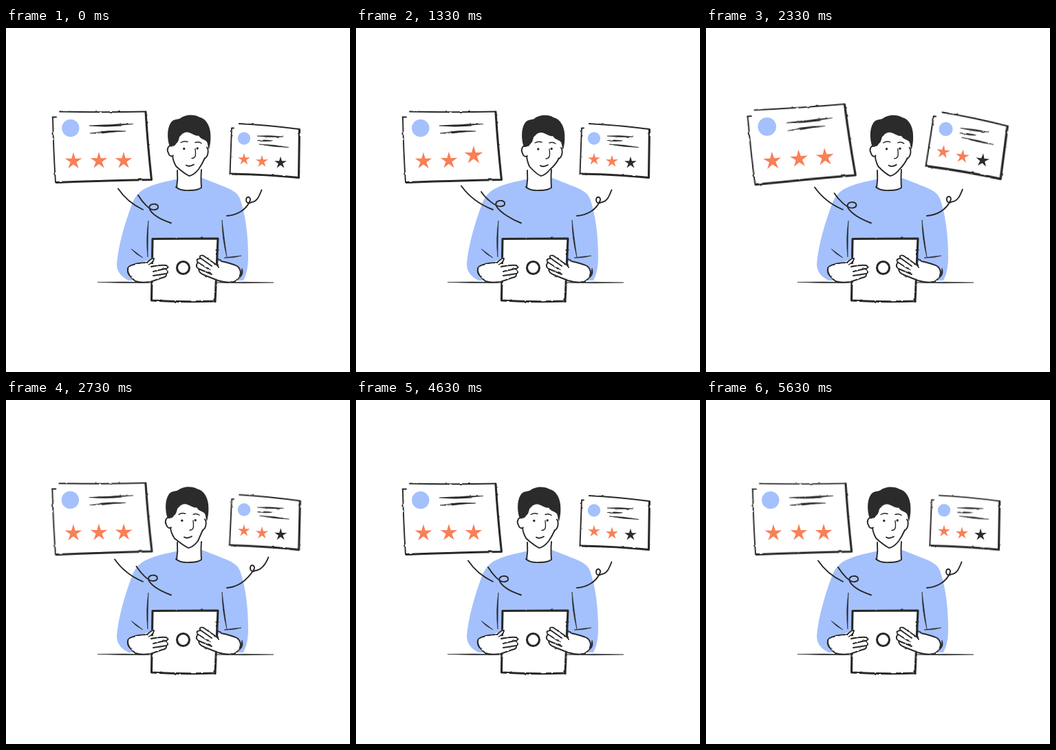
Recreate the animation shown at these times as an HTML page. Size 500 by 500 pixels, loop 5710 ms.

```html
<!DOCTYPE html>
<html lang="en">
<head>
<meta charset="utf-8">
<title>Reviews</title>
<style>
  html, body { margin: 0; width: 100%; height: 100%; overflow: hidden; background: #fff; }
  svg { display: block; width: 100%; height: 100%; }
  .line { fill: none; stroke: #282828; stroke-width: 1.9; stroke-linecap: round; stroke-linejoin: round; }
  .thick { stroke-width: 3.1; }
  .thin { stroke-width: 1.4; }
  .ink { fill: #2b2b2b; }
  .blue { fill: #a4c1fd; }
  .white { fill: #fff; }
  .orange { fill: #f87f56; }
  .rough { filter: url(#rough); }
</style>
</head>
<body>
<svg id="stage" viewBox="0 0 500 500">
  <filter id="rough" color-interpolation-filters="sRGB">
    <feTurbulence type="fractalNoise" baseFrequency="0.12" numOctaves="2" seed="4"/>
    <feDisplacementMap in="SourceGraphic" scale="2.2" xChannelSelector="R" yChannelSelector="G"/>
  </filter>

  <g id="table"></g>

  <g id="body">
    <path class="blue" d="M247 220C232 223 215 227 205 232C193 237 187 246 183 256C173 283 163 316 161 343C161 354 167 361 178 367L345 367C350 358 352 346 352 334C352 300 348 270 340 248C336 238 326 234 313 229C303 225 294 221 285 218Z"/>
    <path class="white" d="M249 200L248 233Q266 240 284 232L284 200Z"/>
    <path class="line" d="M249 207Q250 220 248 232M284 206Q283 220 284 231"/>
    <path class="line" d="M247 231Q253 237 267 236Q279 236 284 232"/>
  </g>

  <g id="head">
    <path id="skin" class="white"/>
    <path id="jaw" class="line"/>
    <g id="face">
      <path class="white line" d="M247 172C242 170 239 177 242 182C243 186 246 188 249 186"/>
      <path class="white line" d="M298 174C301 178 300 187 295 190"/>
      <path class="ink" d="M244 173C240 162 240 147 245 139C249 132 255 134 259 132C267 125 281 126 287 130C297 132 302 143 303 152C304 162 303 170 301 177C299 174 300 170 298 166C295 162 290 163 286 157C281 158 276 153 270 152C265 152 262 154 260 157C257 158 258 163 255 167C252 169 252 173 248 172Z"/>
      <path class="line thin" d="M260 167Q265 164 270 166M281 167Q286 165 290 168M281 176Q282 184 281 187Q279 190 276 190"/>
      <path class="line" d="M268 200Q272 203 279 199"/>
      <circle class="ink" cx="264.8" cy="176" r="1.7"/>
      <circle class="ink" cx="284.2" cy="175.5" r="1.7"/>
    </g>
  </g>

  <g id="sleeves"></g>

  <path class="white line thick rough" d="M213 306.5L308 306L304 397Q258 399 211.5 396Z"/>
  <circle class="line thick" cx="257.5" cy="348.5" r="9"/>

  <g id="hands" class="rough">
    <path class="white" d="M178 347C188 340 199 342 208 337Q214 332 215 336L211 343L233 344Q238 348 235 355Q235 362 226 365L211 369L188 369Q175 360 178 347Z"/>
    <path class="line" d="M205 341Q212 334 215 335Q215 340 208 344M211 347Q224 344 233 345Q238 349 231 350L213 354M231 350Q238 353 233 357L214 360M233 357Q234 362 227 363L210 369Q196 371 188 368"/>
    <path class="line" d="M205 341Q188 341 178 347Q174 357 187 367"/>
    <path class="white" d="M281 332Q284 328 289 332L307 344Q309 338 314 338C323 343 336 341 341 351Q342 362 331 369L308 368L284 358L277 347Q274 338 282 336Z"/>
    <path class="line" d="M307 345L287 331Q281 329 282 334L299 346M283 335Q276 335 278 340L297 352M278 342Q275 347 280 350L299 358M280 350Q280 356 288 359L308 367Q322 371 331 369"/>
    <path class="line" d="M309 348Q306 340 307 337Q310 335 313 339Q327 342 336 346Q344 353 339 362Q336 367 331 369"/>
  </g>

  <path id="tail" class="line"/>
  <path id="leftCurl" class="line"/>
  <path id="rightCurl" class="line"/>
  <g id="bigCard"></g>
  <g id="smallCard"></g>
</svg>

<script>
const LOOP = 5710, HALF = LOOP / 2;
const $ = id => document.getElementById(id);
const lerp = (a, b, k) => a + (b - a) * k;
const mix = (p, q, k) => [lerp(p[0], q[0], k), lerp(p[1], q[1], k)];

function add(parent, tag, attrs) {
  const node = document.createElementNS("http://www.w3.org/2000/svg", tag);
  for (const key in attrs) node.setAttribute(key, attrs[key]);
  return parent.appendChild(node);
}

// A brush stroke that swells in the middle.
function brush(parent, x1, y1, x2, y2, width, bend = 0) {
  const len = Math.hypot(x2 - x1, y2 - y1);
  const nx = (y1 - y2) / len, ny = (x2 - x1) / len;
  const mx = (x1 + x2) / 2, my = (y1 + y2) / 2;
  const mid = k => `${mx + nx * k} ${my + ny * k}`;
  const d = `M${x1} ${y1}Q${mid(bend + width)} ${x2} ${y2}Q${mid(bend - width)} ${x1} ${y1}Z`;
  add(parent, "path", { d, class: "ink", stroke: "#2b2b2b", "stroke-width": 0.6 });
}

function star(parent, x, y, r, fill = "orange") {
  const points = Array.from({ length: 10 }, (_, i) => {
    const a = i * Math.PI / 5 - Math.PI / 2, k = i % 2 ? r * 0.36 : r;
    return `${(Math.cos(a) * k).toFixed(2)},${(Math.sin(a) * k).toFixed(2)}`;
  }).join(" ");
  const node = add(parent, "polygon", { points, class: fill, transform: `translate(${x} ${y})` });
  return { node, x, y };
}

brush($("table"), 133, 369.5, 212, 370, 1.5);
brush($("table"), 304, 370, 389, 370, 1.5);

const sleeves = $("sleeves");
brush(sleeves, 207, 280, 206, 333, 1.6, 2);
brush(sleeves, 314, 279, 321, 333, 1.6, 2);
brush(sleeves, 182, 321, 199, 334, 1.4, 1);
brush(sleeves, 317, 334, 342, 331, 1.5, 1);
brush(sleeves, 177, 348, 181, 362, 2, 3);
brush(sleeves, 343, 349, 340, 363, 2, -3);

const big = $("bigCard");
const bigFrame = add(big, "g", { class: "rough" });
add(bigFrame, "path", { class: "white", d: "M68 122L204 121L212 221L73 225Z" });
add(bigFrame, "path", { class: "line", d: "M78 121.5Q140 123 203 121.5M67.5 129.5L73 129.5M68 130Q69 180 72 224" });
add(bigFrame, "path", { class: "line thick", d: "M203 122Q206 170 211.5 220.5Q140 222 73 224.5" });
brush(bigFrame, 121, 142, 168, 142, 2.4);
brush(bigFrame, 138, 142, 185, 139.5, 2);
brush(bigFrame, 122, 153, 160, 150.5, 2.2);
brush(bigFrame, 138, 150.5, 174, 150, 1.8);
add(big, "circle", { class: "blue", cx: 93.8, cy: 145.5, r: 12.7 });

const small = $("smallCard");
const smallFrame = add(small, "g", { class: "rough" });
add(smallFrame, "path", { class: "white", d: "M328 139L427 147L426 218L326 212Z" });
add(smallFrame, "path", { class: "line", d: "M338 139Q380 141 426 147M328 145.5L331 145.5M328 146L325.5 212" });
add(smallFrame, "path", { class: "line thick", d: "M426.5 147.5L425.5 217.5Q380 213 326 212" });
brush(smallFrame, 365, 157, 403, 158, 2);
brush(smallFrame, 365, 163.5, 388, 164, 1.9);
brush(smallFrame, 368, 169, 411, 173.5, 1.9);
add(small, "circle", { class: "blue", cx: 346, cy: 160.5, r: 9.2 });

const hops = [
  { ...star(big, 98, 193.5, 13), peak: 680, lift: 9 },
  { ...star(big, 135, 193, 13), peak: 970, lift: 9 },
  { ...star(big, 171, 193, 13), peak: 1240, lift: 9 },
  { ...star(small, 346, 191, 9.3), peak: 500, lift: 6 },
  { ...star(small, 372, 194, 9.5), peak: 870, lift: 6 }
];
star(small, 399, 196, 9.3, "ink");

const bump = (t, peak, half) => {
  const d = Math.abs(t - peak) / half;
  return d < 1 ? Math.cos(d * Math.PI / 2) ** 2 : 0;
};

// Eased value along [time, value] keys.
function track(keys, t) {
  let [t0, v0] = keys[0];
  for (const [t1, v1] of keys) {
    if (t < t1) {
      const k = Math.max(0, (t - t0) / (t1 - t0));
      return lerp(v0, v1, k * k * (3 - 2 * k));
    }
    [t0, v0] = [t1, v1];
  }
  return v0;
}

const headKeys = [[100, -6], [520, 0], [2180, 0], [2640, -9], [3900, -9], [4200, -6]];
const tailKeys = [[80, 0], [580, 1], [1350, 1], [1900, 0.5], [2750, 0.5], [3250, 0]];
const leftKeys = [[80, 0], [580, 1], [1350, 1], [1900, 0.6], [2200, 0.6], [2720, 0.25], [3100, 0]];
const rightKeys = [[2200, 0], [2760, 1], [3900, 1], [4250, 0]];

function drawHead(t) {
  const shift = track(headKeys, t), chin = 270.5 + shift * 0.4;
  const top = 248 + shift, side = 295 + shift;
  const curve = `Q${top} 192 ${252 + shift * 0.8} 201Q${chin - 10} 211 ${chin - 2} 215` +
    `Q${chin + 5} 214 ${chin + 12} 205Q${side - 4} 198 ${side} 189`;
  $("face").setAttribute("transform", `translate(${shift} ${shift * 0.08})`);
  $("skin").setAttribute("d", `M${top} 160L${top} 184${curve}L${side + 2} 160Z`);
  $("jaw").setAttribute("d", `M${top} 184${curve}`);
}

function drawCurls(t) {
  const tail = track(tailKeys, t);
  const [sx, sy] = mix([163, 233.5], [153, 229.5], tail);
  $("tail").setAttribute("d", `M${sx} ${sy}Q${lerp(176, 170, tail)} 253 199 264`);

  const left = track(leftKeys, t);
  const [ax, ay] = mix([192, 243], [182, 238], left);
  const [cx, cy] = mix([215, 260], [210, 255], left);
  const at = (x, y) => `${cx + x} ${cy + y}`;
  $("leftCurl").setAttribute("d",
    `M${ax} ${ay}C${ax + 5} ${ay + 8} ${at(-6, 7)} ${at(2, 4)}C${at(8, 3)} ${at(7, -3)} ${at(2, -4)}` +
    `C${at(-5, -5)} ${at(-8, -1)} ${at(-6, 4)}C${at(0, 14)} 228 279 240 283.5`);

  const right = track(rightKeys, t);
  const [ex, ey] = mix([371.5, 235.5], [381.5, 228.5], right);
  const [rx, ry] = mix([353, 250.5], [359, 245], right);
  const by = (x, y) => `${rx + x} ${ry + y}`;
  $("rightCurl").setAttribute("d",
    `M321 273C336 272 349 264 ${by(1, 2)}C${by(4, -3)} ${by(0, -6)} ${by(-3, -4)}` +
    `C${by(-6, 2)} ${by(-1, 6)} ${by(3, 3)}C${by(12, 2)} ${ex - 4} ${ey + 10} ${ex} ${ey}`);
}

function render(t) {
  drawHead(t);
  drawCurls(t);

  const phase = t % HALF;
  const pop = bump(phase, 2325, 500);
  big.setAttribute("transform",
    `translate(${72 - 0.6 * pop} ${225 + 3.2 * pop}) rotate(${-3.8 * pop}) scale(${1 + 0.05 * pop}) translate(-72 -225)`);
  small.setAttribute("transform",
    `translate(${426 + 2.6 * pop} ${218 + 2 * pop}) rotate(${6.7 * pop}) scale(${1 + 0.1 * pop}) translate(-426 -218)`);

  for (const { node, x, y, peak, lift } of hops) {
    const k = bump(phase, peak, 400);
    node.setAttribute("transform", `translate(${x} ${y - lift * k}) scale(${1 + 0.1 * k})`);
  }
}

const start = performance.now();
function tick() {
  render((performance.now() - start) % LOOP);
  requestAnimationFrame(tick);
}
tick();
</script>
</body>
</html>
```
